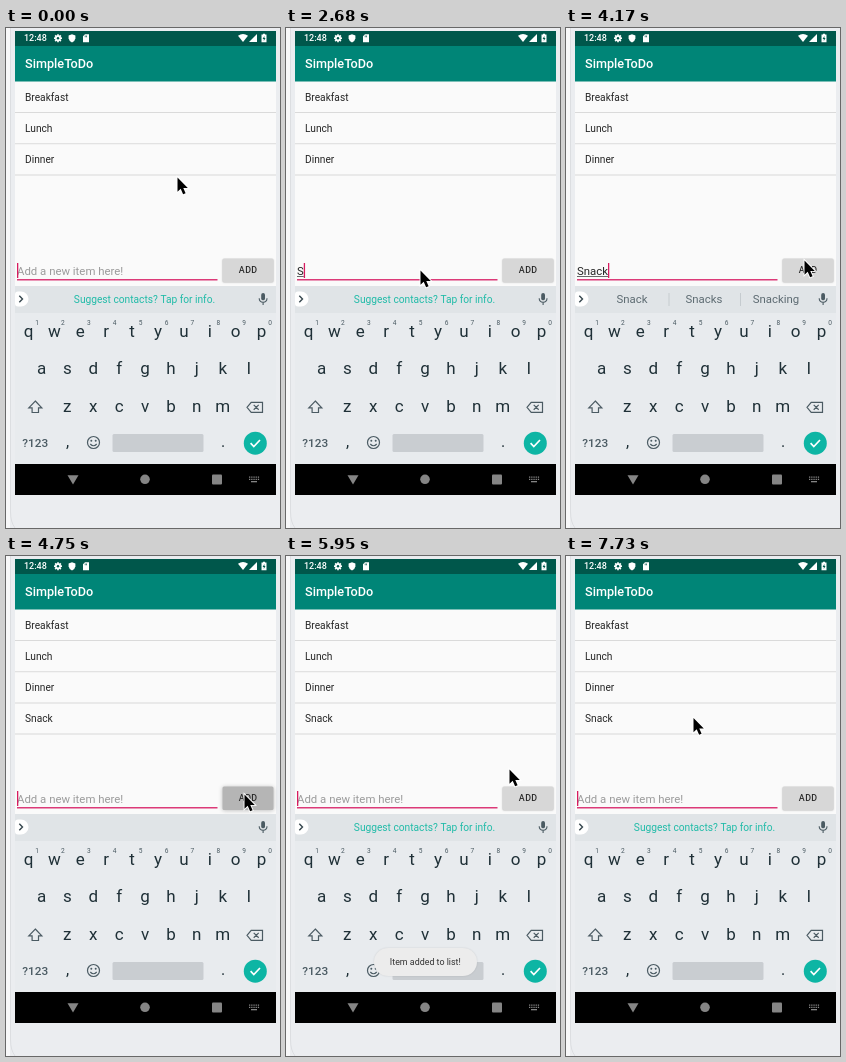
Animation, 274 px wide and 500 px high, one loop 8000 ms. Source, as an HTML page with a canvas:

```html
<!DOCTYPE html>
<html lang="en">
<head>
<meta charset="utf-8">
<title>To-do list</title>
<style>
  html, body { margin: 0; width: 100%; height: 100%; overflow: hidden; background: #ebedf0; }
  canvas { display: block; width: 274px; height: 500px; }
</style>
</head>
<body>
<canvas id="stage"></canvas>
<script>
const LOOP = 8000, STEP = 148.8, FIRST_STEP = 135;
const canvas = document.getElementById('stage');
const ctx = canvas.getContext('2d');
const ratio = window.devicePixelRatio || 1;
canvas.width = 274 * ratio;
canvas.height = 500 * ratio;

const pointerPath = [
  [7, 171.5, 149.5], [8, 169, 168], [9, 158, 204], [10, 143, 232], [11, 134.5, 242.5],
  [23, 134.5, 242.5], [24, 150, 241], [25, 190, 236], [26, 228, 232], [27, 238.5, 232.5],
  [29, 238.5, 236], [31, 238.5, 238.5], [37, 238.5, 238.5], [38, 234, 229], [39, 223.5, 213.5],
  [41, 196, 187], [43, 162, 175], [45, 141, 182], [46, 136.5, 185.5], [48, 131, 174], [51, 127.5, 162]
];
const caretFlips = [1, 4, 8, 11, 14, 17, 24, 27, 34, 38, 41, 44, 48, 51];
const typed = [[17, 'S'], [18, 'Sn'], [19, 'Snac'], [21, 'Snack'], [31, '']];
const tip = ['Suggest contacts? Tap for info.'];
const suggestions = [
  [-1, tip], [18, ['Sn', 'Snow', 'Snap']], [19, ['Snac', 'Snack', 'Snacks']],
  [21, ['Snack', 'Snacks', 'Snacking']], [31, []], [32, tip]
];
const buttonShade = [[0, 215], [28, 215], [29, 205], [31, 181], [32, 193], [34, 215]];
const toastAlpha = [[31, 0], [33, 1], [45, 1], [46, .55], [48, 0]];

function latest(list, n, fallback) {
  return list.reduce((value, [at, next]) => n >= at ? next : value, fallback);
}

function track(keys, n, channel = 1) {
  const i = keys.findIndex(key => key[0] > n);
  if (i === 0) return keys[0][channel];
  if (i < 0) return keys[keys.length - 1][channel];
  const a = keys[i - 1], b = keys[i];
  return a[channel] + (b[channel] - a[channel]) * (n - a[0]) / (b[0] - a[0]);
}

function rect(x, y, w, h, color, radius = 0) {
  ctx.fillStyle = color;
  ctx.beginPath();
  ctx.roundRect(x, y, w, h, radius);
  ctx.fill();
}

function circle(x, y, r, color) {
  rect(x - r, y - r, r * 2, r * 2, color, r);
}

function text(str, x, y, size, color, align = 'left', weight = 400) {
  ctx.font = `${weight} ${size}px Roboto, sans-serif`;
  ctx.textAlign = align;
  ctx.fillStyle = color;
  ctx.fillText(str, x, y);
}

function shape(d, x, y, fill, stroke, width = 1) {
  const path = new Path2D(d);
  ctx.save();
  ctx.translate(x, y);
  if (stroke) {
    ctx.strokeStyle = stroke;
    ctx.lineWidth = width;
    ctx.stroke(path);
  }
  if (fill) {
    ctx.fillStyle = fill;
    ctx.fill(path, 'evenodd');
  }
  ctx.restore();
}

function drawFrame() {
  rect(0, 0, 274, 500, '#ebedf0');
  rect(0, 0, 4, 500, '#f8f8f9');
  shape('M4.5 0V484Q4.5 494 9 500', 0, 0, null, '#dcdee1');
  rect(9, 3, 261, 464, '#fafafa');
}

function drawStatusBar() {
  rect(9, 3, 261, 15, '#00574b');
  text('12:48', 18, 13.2, 9, '#fff', 'left', 500);
  for (let i = 0; i < 4; i++) {
    const a = i * Math.PI / 4, c = Math.cos(a) * 4, s = Math.sin(a) * 4;
    shape(`M${-c} ${-s}L${c} ${s}`, 52, 10.2, null, '#fff', 1.7);
  }
  circle(52, 10.2, 2.9, '#fff');
  circle(52, 10.2, 1.2, '#00574b');
  shape('M0-4L3.4-2.6V0Q3 3 0 4.3Q-3 3-3.4 0V-2.6Z', 66, 10.2, '#fff');
  shape('M-1-4H3V4H-3V-2ZM-1.2-2.6v1.7h.7v-1.7ZM.2-2.6v1.7h.7v-1.7Z', 80, 10.2, '#fff');
  shape('M0 4L-5-2.2Q0-5.6 5-2.2Z', 237, 10, '#fff');
  shape('M4-4V4H-4Z', 247, 10, '#fff');
  shape('M-1-4.3H1V-3.4H2.5V4.3H-2.5V-3.4H-1ZM.4-2L-1.4 .9H-.2V3L1.5 0H.4Z', 258, 10, '#fff');
}

function drawList(n) {
  rect(9, 18, 261, 35.5, '#008577');
  text('SimpleToDo', 19, 40.3, 12.7, '#fff', 'left', 500);
  const items = ['Breakfast', 'Lunch', 'Dinner'];
  if (n >= 31) items.push('Snack');
  items.forEach((item, i) => {
    text(item, 19, 72.7 + i * 31.2, 10.2, '#262626');
    rect(9, 84 + i * 31.2, 261, 1, '#dadada');
  });
}

function drawInput(n) {
  const value = latest(typed, n, '');
  text(value || 'Add a new item here!', 11, 247, 11.4, value ? '#262626' : '#9b9b9b');
  const end = value ? ctx.measureText(value).width : 0;
  if (value) rect(11, 248, end, .8, '#444');
  rect(11, 251, 200.5, 1.4, '#dc3a78');
  const flips = caretFlips.filter(at => n >= at).length;
  if (flips % 2 === 0) rect(11 + end, 235, 1.3, 15, '#d81b60');

  const shade = Math.round(track(buttonShade, n));
  ctx.save();
  ctx.shadowColor = 'rgba(0,0,0,.25)';
  ctx.shadowBlur = (shade < 210 ? 4 : 1.5) * ratio;
  ctx.shadowOffsetY = ratio * .6;
  rect(216.5, 230.5, 51, 23.5, `rgb(${shade},${shade},${shade})`, 1.5);
  ctx.restore();
  ctx.letterSpacing = '0.4px';
  text('ADD', 242.2, 245.3, 8.9, '#2b2b2b', 'center', 500);
  ctx.letterSpacing = '0px';
}

function drawSuggestions(n) {
  rect(9, 258, 261, 27, '#e0e4e7');
  rect(9, 263.5, 13.5, 15, '#fff', [3, 7.5, 7.5, 3]);
  shape('M-1.7-3.2L1.5 0L-1.7 3.2', 15, 271, null, '#37474f', 1.4);
  rect(255.2, 265, 3.8, 7.3, '#4b5b63', 1.9);
  shape('M-3.9-.8Q-3.9 3.2 0 3.2Q3.9 3.2 3.9-.8M0 3.2V6', 257.1, 271, null, '#4b5b63', 1.1);
  const words = latest(suggestions, n, tip);
  if (words.length === 1) return text(words[0], 138.5, 275, 10.2, '#20bba8', 'center');
  words.forEach((word, i) => {
    text(word, 66 + i * 72, 275.2, 11.4, '#5d6b72', 'center');
    if (i) rect(31 + i * 71.5, 265, 1, 13, '#c5cbcf');
  });
}

function drawKeyboard() {
  const ink = '#1f3037', soft = '#4b5b63';
  rect(9, 285, 261, 151, '#e8ebee');
  const rows = [['qwertyuiop', 22.5, 309], ['asdfghjkl', 35.5, 346.3], ['zxcvbnm', 61.3, 384]];
  rows.forEach(([keys, x, y], row) => [...keys].forEach((key, i) => {
    const cx = x + i * 25.9;
    text(key, cx, y, 17, ink, 'center');
    if (row === 0) text((i + 1) % 10, cx + 8.5, 296.5, 6.6, soft, 'center');
  }));
  shape('M0-6L6.5 .8H3.2V5.5H-3.2V.8H-6.5Z', 29.3, 379, null, soft, 1.2);
  shape('M-8 0L-3.8-5H7.5V5H-3.8ZM-1.3-2.4L3.7 2.4M3.7-2.4L-1.3 2.4', 249, 379.3, null, soft, 1.2);

  text('?123', 29.2, 419, 11.8, soft, 'center', 500);
  text(',', 61.5, 419, 16, ink, 'center');
  text('.', 217, 419, 16, ink, 'center');
  shape('M6 0A6 6 0 1 1-6 0A6 6 0 1 1 6 0M-3.2 1.5Q0 5 3.2 1.5', 87.5, 414.5, null, soft, 1.2);
  circle(85.3, 412.8, 1, soft);
  circle(89.7, 412.8, 1, soft);
  rect(106.5, 406, 91, 18, '#c9cdd1', 1.5);
  circle(249.3, 415.2, 11.5, '#0db5a4');
  shape('M-4.7 0L-1.5 3.3L4.7-3.2', 249.3, 415.2, null, '#fff', 1.7);
}

function drawNavigation() {
  rect(9, 436, 261, 31, '#000');
  const grey = '#858585';
  shape('M-5.5-4.2H5.5L0 5Z', 67, 451.5, grey);
  circle(139, 451.3, 4.8, grey);
  rect(206, 446.5, 10, 10, grey, 1);
  for (let row = 0; row < 2; row++)
    for (let col = 0; col < 5; col++) rect(243 + col * 2.2, 448.5 + row * 2.2, 1.3, 1.3, grey);
  rect(245, 453, 6, 1.3, grey);
}

function drawToast(n) {
  const alpha = track(toastAlpha, n);
  if (!alpha) return;
  ctx.save();
  ctx.globalAlpha = alpha;
  ctx.shadowColor = 'rgba(0,0,0,.12)';
  ctx.shadowBlur = 2 * ratio;
  rect(88, 392, 103, 28, '#ececec', 14);
  ctx.shadowColor = 'transparent';
  text('Item added to list!', 139.3, 409, 8.9, '#333', 'center');
  ctx.restore();
}

function render(time) {
  const n = Math.floor((time % LOOP - FIRST_STEP) / STEP);
  ctx.setTransform(ratio, 0, 0, ratio, 0, 0);
  drawFrame();
  drawStatusBar();
  drawList(n);
  drawInput(n);
  drawSuggestions(n);
  drawKeyboard();
  drawNavigation();
  drawToast(n);
  shape('M0 0V14.3L3.2 11.3L5.6 16.8L8.1 15.7L5.8 10.4H10.3Z',
    track(pointerPath, n, 1), track(pointerPath, n, 2), '#000', '#fff', 1.8);
}

const start = performance.now();
function tick() {
  render(performance.now() - start);
  requestAnimationFrame(tick);
}
tick();
</script>
</body>
</html>
```
